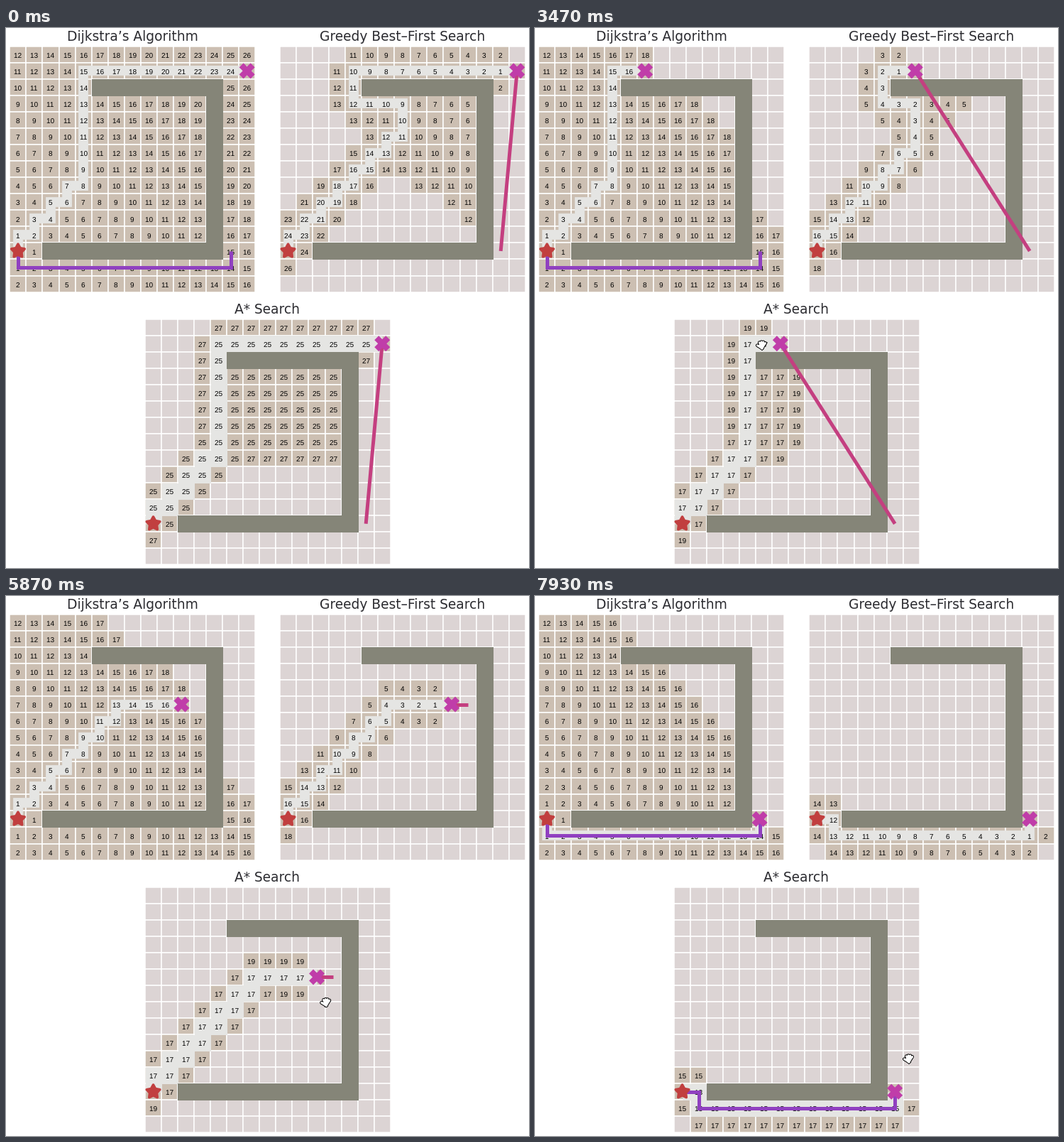
These frames come from a looping animation (737 by 760 pixels, 8000 ms). A matplotlib script:

```python
import itertools

import matplotlib.pyplot as plt
import numpy as np
from matplotlib.animation import FuncAnimation
from matplotlib.colors import ListedColormap
from matplotlib.patches import PathPatch, Polygon, Rectangle
from matplotlib.path import Path
from matplotlib.textpath import TextPath

WIDTH, HEIGHT, DPI = 737, 760, 72  # at 72 dpi one point is one pixel
FRAMES, INTERVAL = 125, 64
N, PITCH = 15, 23.05
START = (0, 12)
WALL_BARS = [(5, 2, 8, 1), (12, 2, 1, 11), (2, 12, 11, 1)]  # x, y, width, height
WALLS = {(x + i, y + j) for x, y, w, h in WALL_BARS for i in range(w) for j in range(h)}

EMPTY, SEEN, WALL, ROUTE = "#dcd4d4", "#ccbfb2", "#858578", "#e5e5e3"
STAR, CROSS, PURPLE, PINK = "#c13f3f", "#c03da9", "#9040c0", "#c43f80"

# Key points of the pointer: time in ms, x, y
POINTER = np.array([
    (130, 707, 385), (870, 528, 442), (1270, 528, 442), (2000, 490, 440),
    (2670, 421, 438), (3470, 310, 438), (3800, 302, 442), (4250, 302, 490),
    (4600, 348, 508), (4800, 367, 498), (5450, 445, 512), (5870, 443, 570),
    (6650, 445, 672), (7130, 445, 672), (7470, 512, 696), (7850, 512, 696),
    (7860, 519, 643),
])
DRAG_START, DRAG_END, LAG = 1270, 7470, 200
HOVER = [(0, (13, 12)), (5450, (11, 5)), (6270, (11, 7)), (7400, (13, 12))]


def neighbors(cell):
    x, y = cell
    around = [(x + 1, y), (x, y + 1), (x - 1, y), (x, y - 1)]
    if (x + y) % 2 == 0:  # alternate the order so ties give staircase routes
        around.reverse()
    return [(a, b) for a, b in around
            if 0 <= a < N and 0 <= b < N and (a, b) not in WALLS]


def rank(kind, cost, left):
    """Sort key of a cell; its first item is the number shown."""
    return {"dijkstra": (cost, 0), "greedy": (left, 0), "astar": (cost + left, left)}[kind]


def search(kind, goal):
    cost, parent, label = {START: 0}, {START: None}, {START: 0}
    order = itertools.count()
    frontier = [(0, 0, next(order), START)]
    while frontier:
        entry = min(frontier)
        frontier.remove(entry)
        cell = entry[-1]
        if cell == goal:
            break
        for step in neighbors(cell):
            new_cost = cost[cell] + 1
            better = kind != "greedy" and new_cost < cost.get(step, 0)
            if step not in cost or better:
                left = abs(step[0] - goal[0]) + abs(step[1] - goal[1])
                key = rank(kind, new_cost, left)
                cost[step], parent[step], label[step] = new_cost, cell, key[0]
                frontier.append((*key, next(order), step))
    return parent, label


def trace(parent, cell):
    route = []
    while cell is not None:
        route.append(cell)
        cell = parent.get(cell)
    return route


glyphs = {}


def number_path(value):
    if value not in glyphs:
        text = TextPath((0, 0), str(value), size=10, prop={"family": "Liberation Sans"})
        glyphs[value] = (text.vertices * (1, -1), text.codes)
    return glyphs[value]


class Panel:
    def __init__(self, ax, kind, title, title_x, left, top, route_width):
        self.kind, self.origin = kind, np.array([left, top])
        edges = np.arange(N + 1) * PITCH
        self.mesh = ax.pcolormesh(left + edges, top + edges, np.zeros((N, N)),
                                  cmap=ListedColormap([EMPTY, SEEN]), vmin=0, vmax=1,
                                  edgecolors="white", linewidth=1.5,
                                  antialiased=True, zorder=1)

        def stroke(color, width, zorder):
            return ax.plot([], [], color=color, lw=width, zorder=zorder,
                           solid_capstyle="butt", solid_joinstyle="miter")[0]

        self.route = stroke(ROUTE, route_width, 2)
        self.so_far = stroke(PURPLE, 5, 5)
        self.to_go = stroke(PINK, 5, 5)
        self.cross = [stroke(CROSS, 8.5, 7) for _ in range(2)]
        for x, y, w, h in WALL_BARS:
            ax.add_patch(Rectangle(self.origin + np.array([x, y]) * PITCH, w * PITCH,
                                   h * PITCH, fc=WALL, ec=WALL, lw=1, zorder=3))
        self.numbers = ax.add_patch(PathPatch(Path([(0, 0)]), fc="black", lw=0, zorder=4))

        angle = np.arange(10) * np.pi / 5
        radius = np.where(np.arange(10) % 2, 5.2, 9.8)
        star = np.column_stack([np.sin(angle), -np.cos(angle)]) * radius[:, None]
        ax.add_patch(Polygon(self.center(START) + star, fc=STAR, ec=STAR, lw=3.6,
                             joinstyle="round", zorder=6))
        ax.text(title_x, top - 8, title, ha="center", va="baseline", fontsize=18.6,
                family="DejaVu Sans", color="#2b2b30")

    def center(self, cell):
        return self.origin + (np.array(cell) + 0.5) * PITCH

    def cell_at(self, x, y):
        return tuple(int(k) for k in (np.array([x, y]) - self.origin) // PITCH)

    def set_line(self, line, cells):
        points = np.array([self.center(c) for c in cells]).reshape(-1, 2)
        line.set_data(points[:, 0], points[:, 1])

    def show(self, goal, hover):
        parent, label = search(self.kind, goal)
        seen = np.zeros((N, N))
        vertices, codes = [], []
        for (x, y), value in label.items():
            seen[y, x] = 1
            if (x, y) not in (START, goal):
                shape, shape_codes = number_path(value)
                offset = (-2.78 * len(str(value)), 4.7)
                vertices.append(shape + np.round(self.center((x, y)) + offset))
                codes.append(shape_codes)
        self.mesh.set_array(seen)
        self.numbers.set_path(Path(np.concatenate(vertices), np.concatenate(codes)))

        self.set_line(self.route, trace(parent, goal))
        reached = self.kind != "greedy" and hover in parent
        self.set_line(self.so_far, trace(parent, hover) if reached else [])
        pointing = self.kind != "dijkstra" and hover != goal
        self.set_line(self.to_go, [goal, hover] if pointing else [])

        gx, gy = self.center(goal)
        for line, slope in zip(self.cross, (1, -1)):
            line.set_data([gx - 8, gx + 8], [gy - 8 * slope, gy + 8 * slope])


def pointer_at(t):
    return np.array([np.interp(t, POINTER[:, 0], POINTER[:, k]) for k in (1, 2)])


def goal_track(panel):
    """Goal cell of every frame: it trails the pointer and skips walls."""
    goals = []
    for frame in range(FRAMES):
        t = np.clip(frame * INTERVAL - LAG, DRAG_START, DRAG_END)
        cell = panel.cell_at(*pointer_at(t))
        goals.append(goals[-1] if cell in WALLS else cell)
    return goals


def hand_shape():
    """Zigzag from the palm to five fanned fingertips."""
    palm = np.array([8, 10.5])
    angles = np.radians([-75, -32, -8, 16, 42])
    tips = palm + 7 * np.column_stack([np.sin(angles), -np.cos(angles)])
    wrist = palm + (0, 2.5)
    return np.array([point for tip in tips for point in (palm, tip, wrist)])


fig = plt.figure(figsize=(WIDTH / DPI, HEIGHT / DPI), dpi=DPI, facecolor="white")
ax = fig.add_axes([0, 0, 1, 1])
ax.axis("off")
panels = [
    Panel(ax, "dijkstra", "Dijkstra’s Algorithm", 178.5, 5.4, 25.8, 13.8),
    Panel(ax, "greedy", "Greedy Best–First Search", 559, 386, 25.8, 13.8),
    Panel(ax, "astar", "A* Search", 368.5, 196, 409.6, PITCH),
]
goals = goal_track(panels[-1])
hand = hand_shape()
pointer = [ax.plot([], [], color=color, lw=width, zorder=10, solid_capstyle="round",
                   solid_joinstyle="round")[0]
           for color, width in (("black", 4.6), ("white", 2.6))]
ax.set_xlim(0, WIDTH)
ax.set_ylim(HEIGHT, 0)


def update(frame):
    t = frame * INTERVAL
    hover = [cell for start, cell in HOVER if start <= t][-1]
    for panel in panels:
        panel.show(goals[frame], hover)
    points = hand + pointer_at(t)
    for line in pointer:
        line.set_visible(frame >= 2)
        line.set_data(points[:, 0], points[:, 1])
    return []


animation = FuncAnimation(fig, update, frames=FRAMES, interval=INTERVAL,
                          repeat=True, repeat_delay=0, blit=False)
plt.show()
```
